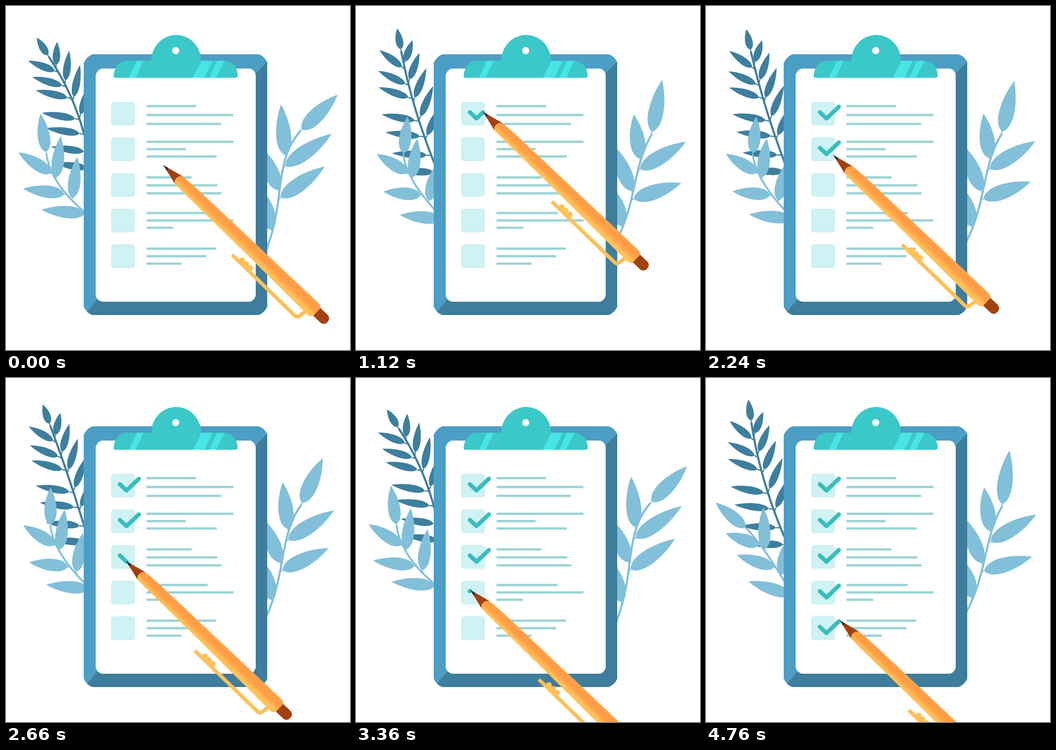
These frames come from a looping animation (748x748 px, 4.83 s). An HTML page:

```html
<!DOCTYPE html>
<html lang="en">
<head>
<meta charset="utf-8">
<title>Checklist</title>
<style>
html, body { margin: 0; width: 100%; height: 100%; overflow: hidden; background: #fff; }
svg { display: block; width: 100vw; height: 100vh; }
</style>
</head>
<body>
<svg viewBox="0 0 748 748">
  <defs>
    <linearGradient id="barrel" gradientUnits="userSpaceOnUse" x1="0" y1="-16" x2="0" y2="18">
      <stop offset="0" stop-color="#fea54b"/>
      <stop offset=".28" stop-color="#fd9c45"/>
      <stop offset=".5" stop-color="#fda148"/>
      <stop offset=".78" stop-color="#ffc159"/>
      <stop offset="1" stop-color="#ffc45a"/>
    </linearGradient>
  </defs>
  <g id="plants"></g>
  <g id="board">
    <path fill="#4c9ec5" d="M188 105H549Q562 109 568 122V654Q562 667 549 672H188Q175 667 169 654V124Q175 110 188 105Z"/>
    <path fill="#3e7d9c" d="M568 121V654Q562 667 549 672H188Q182 670 176 665L204 632H530V160Z"/>
    <path fill="#fff" d="M208 136H531Q541 139 543 150V630Q540 640 531 643H208Q198 640 195 630V150Q198 139 208 136Z"/>
    <path fill="#3ac8c9" d="M234 152Q237 121 262 119H316A54 56 0 0 1 424 119H476Q502 122 504 152Q503 156 499 156H238Q234 156 234 152Z"/>
    <path fill="#47e5e6" d="M285 119H299L282 156H267ZM425 119H449L432 156H406ZM459 119H475L457 156H442Z"/>
    <circle cx="369" cy="97" r="7.7" fill="#fff"/>
  </g>
  <g id="rows"></g>
  <g id="pen">
    <path fill="#a1410f" d="M0 0L47 -11.5V12ZM452 -11.5H484Q494 -10 494 0Q494 10 484 11.5H452Z"/>
    <path fill="#2b3440" d="M0 0L12 -3.2L14.5 3.8Z"/>
    <path fill="none" stroke="#fec058" stroke-width="8" stroke-linejoin="round" d="M243 37.5L432 39Q440 39 441 31L443 15"/>
    <g id="bumps" fill="#fec058"></g>
    <path fill="url(#barrel)" d="M48 -11Q60 -13.5 110 -13.8L262 -15L450 -16.3Q461 -16 462 -9V10Q461 18.5 450 18.5L262 15L110 13Q60 13 46 11.5C38 8 38 -8 48 -11Z"/>
  </g>
</svg>
<script>
const LOOP = 4830, STEP = 70, ROW = 77.5, ROUND = 840, TURN = 3390;
const $ = id => document.getElementById(id);

function add(parent, tag, attrs) {
  const el = document.createElementNS('http://www.w3.org/2000/svg', tag);
  for (const k in attrs) el.setAttribute(k, attrs[k]);
  return parent.appendChild(el);
}

// Blends numbers or nested lists of numbers
const mix = (a, b, w) => Array.isArray(a) ? a.map((v, i) => mix(v, b[i], w)) : a + (b - a) * w;

// Piecewise linear track of [time, ...values]
function track(keys, t) {
  const i = keys.findIndex(k => k[0] > t);
  if (i < 0) return keys[keys.length - 1].slice(1);
  const a = keys[i - 1], b = keys[i];
  return mix(a, b, (t - a[0]) / (b[0] - a[0])).slice(1);
}

// Point at u on the smooth curve through evenly spaced points
function along(pts, u) {
  const s = u * (pts.length - 1);
  let x = 0, y = 0;
  pts.forEach((p, i) => {
    let k = 1;
    pts.forEach((_, j) => { if (j !== i) k *= (s - j) / (i - j); });
    x += p[0] * k;
    y += p[1] * k;
  });
  return [x, y];
}

const even = n => Array.from({ length: n }, (_, i) => n > 1 ? i / (n - 1) : 0);

// A pose is [stem, tip of the top leaf, left tips, right tips], each a curve.
// A side is [first, last, places]: where on the stem its leaves grow.
const TOP = [0, 0, even(1)];
const plants = [
  {
    color: '#3e7f9e', width: 16.5, stem: 4.5, petiole: .12,
    sides: [TOP, [.14, .96, [0, .16, .29, .51, .66, .84, 1]], [.1, .7, even(5)]],
    poses: [
      [[[94, 112], [155, 232], [186, 365]], [[67, 69]],
       [[48, 119], [77, 230], [108, 342]], [[111, 78], [161, 128], [200, 225]]],
      [[[100, 96], [125, 236], [182, 375]], [[97, 42]],
       [[52, 88], [48, 234], [90, 365]], [[127, 73], [150, 138], [177, 216]]]
    ]
  },
  {
    color: '#82bfd9', width: 27, stem: 4, petiole: .05,
    sides: [TOP, [.33, 1, even(3)], [.42, .77, even(2)]],
    poses: [
      [[[88, 322], [115, 388], [176, 452]], [[75, 234]],
       [[27, 318], [37, 397], [77, 443]], [[119, 283], [155, 328]]],
      [[[108, 325], [133, 388], [196, 468]], [[125, 243]],
       [[51, 323], [67, 406], [101, 458]], [[138, 290], [182, 350]]],
      [[[89, 328], [136, 388], [188, 473]], [[21, 271]],
       [[43, 338], [67, 385], [92, 442]], [[125, 281], [175, 355]]]
    ]
  },
  {
    color: '#82bfd9', width: 33, stem: 4.5, petiole: .05,
    sides: [TOP, [.27, .88, even(3)], [.36, .63, even(2)]],
    poses: [
      [[[639, 273], [604, 345], [591, 430], [566, 530]], [[721, 193]],
       [[598, 214], [556, 308], [556, 398]], [[708, 278], [693, 349]]],
      [[[644, 282], [618, 354], [598, 430], [564, 508]], [[647, 150]],
       [[606, 243], [560, 300], [562, 398]], [[720, 301], [712, 397]]]
    ]
  }
];

for (const p of plants) {
  p.lines = add($('plants'), 'path', { fill: 'none', stroke: p.color, 'stroke-width': p.stem, 'stroke-linecap': 'round' });
  p.stalks = add($('plants'), 'path', { stroke: p.color, 'stroke-width': 2.5 });
  p.blades = add($('plants'), 'path', { fill: p.color });
}

function leaf(base, tip, width) {
  const dx = tip[0] - base[0], dy = tip[1] - base[1];
  const h = width * .73 / Math.hypot(dx, dy);
  const at = (u, s) => `${base[0] + dx * u - dy * s * h} ${base[1] + dy * u + dx * s * h}`;
  return `M${base}C${at(.12, 1)} ${at(.62, .8)} ${tip}C${at(.62, -.8)} ${at(.12, -1)} ${base}Z`;
}

function posePlant(p, pose, w) {
  const [stem, ...tips] = mix(p.poses[0], p.poses[pose], w);
  let stalks = '', blades = '';
  p.sides.forEach(([first, last, places], i) => {
    for (const s of places) {
      const root = along(stem, mix(first, last, s)), tip = along(tips[i], s);
      const base = mix(root, tip, p.petiole);
      stalks += `M${root}L${base}`;
      blades += leaf(base, tip, p.width);
    }
  });
  p.lines.setAttribute('d', 'M' + even(24).map(u => along(stem, u)).join('L'));
  p.stalks.setAttribute('d', stalks);
  p.blades.setAttribute('d', blades);
}

for (let i = 0; i < 3; i++) add($('bumps'), 'circle', { cx: 267 + 12 * i, cy: 31, r: 6.2 });

// Each row of text: line gap, then the lengths of its lines
const text = [
  [19.3, 108, 189, 162],
  [16, 189, 85, 153],
  [17.3, 98, 154, 163],
  [16, 133, 189, 58],
  [16.3, 151, 130, 76]
];
const pen = [[0, 342, 346]];
const ticks = text.map(([gap, ...lengths], i) => {
  const dy = i * ROW, start = ROUND * (i + 1);
  add($('rows'), 'rect', { x: 229.5, y: 209 + dy, width: 50, height: 50, rx: 5, fill: '#cff2f4', stroke: '#c0eae9' });
  lengths.forEach((width, j) =>
    add($('rows'), 'rect', { x: 305.5, y: 215.2 + dy + gap * j, width, height: 5, fill: '#9ad3d5' }));
  pen.push([start, 248, 228 + dy], [start + 140, 261, 243 + dy], [start + 420, 291, 217 + dy]);
  return add($('rows'), 'path', {
    d: `M247.5 ${231 + dy}L262 ${244.5 + dy}L289 ${219 + dy}`, fill: 'none', stroke: '#38bdbe',
    'stroke-width': 9, 'stroke-linecap': 'round', 'stroke-linejoin': 'round'
  });
});

const sway = [[0, 0], [1600, 1.07], [TURN, 0], [LOOP, .87]];
const ink = [[0, .01], [140, 20], [420, 58]];

function draw(t) {
  const [w] = track(sway, t);
  const [frond, sprig, branch] = plants;
  posePlant(frond, 1, w);
  posePlant(branch, 1, w);
  if (t < TURN) posePlant(sprig, 1, w);
  else posePlant(sprig, 2, (t - TURN) / 1370);

  ticks.forEach((tick, i) => {
    const age = t - ROUND * (i + 1);
    tick.setAttribute('visibility', age < 0 ? 'hidden' : 'visible');
    if (age >= 0) tick.setAttribute('stroke-dasharray', `${track(ink, age)} 100`);
  });
  $('pen').setAttribute('transform', `translate(${track(pen, t)}) rotate(43.7)`);
}

const begin = performance.now();
function run() {
  const t = (performance.now() - begin) % LOOP;
  draw(Math.floor(t / STEP) * STEP);
  requestAnimationFrame(run);
}
run();
</script>
</body>
</html>
```
